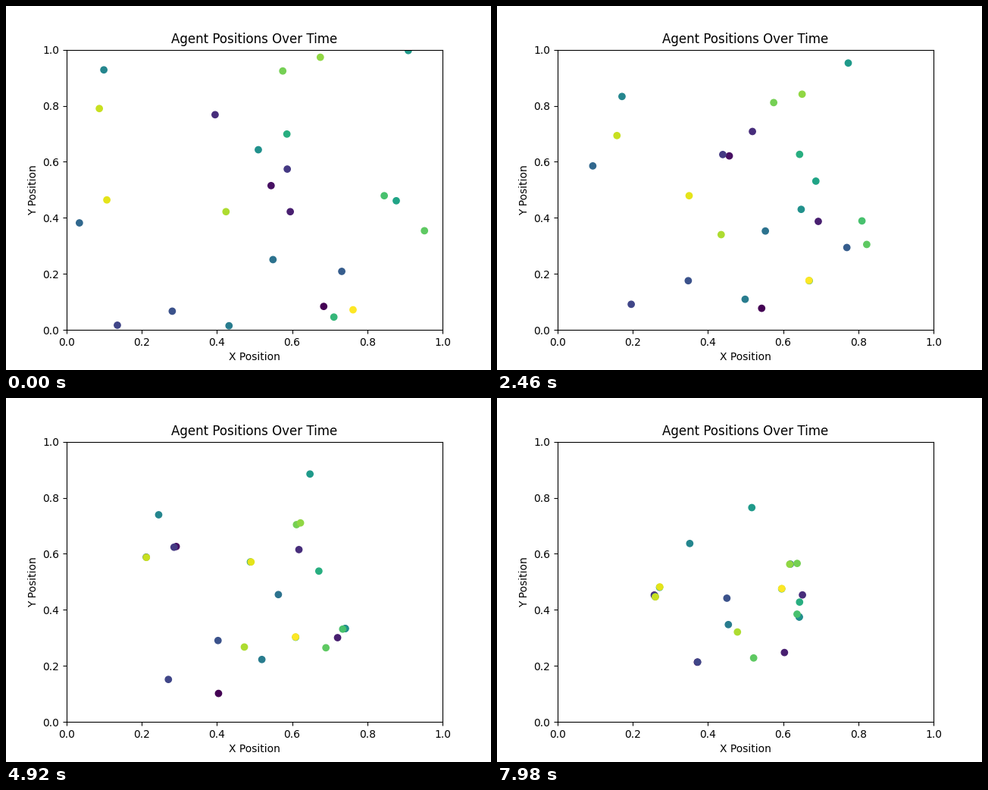
Recreate the animation shown at these times as a matplotlib script. Size 640 px wide and 480 px high, loop 8 s.

```python
import numpy as np
import matplotlib.pyplot as plt
from matplotlib.animation import FuncAnimation

HOLD_MS, TICK_MS, LOOP_MS = 60, 20, 8000
SUBSTEPS = 3

# The only data: start x, start y, speed (1e-5 per shown step), agent chased
AGENTS = np.array([
    (.684, .084, 345, 5), (.544, .515, 410, 4), (.595, .422, 256, 18),
    (.395, .768, 335, 15), (.587, .574, 382, 22), (.135, .017, 235, 21),
    (.281, .067, 311, 13), (.732, .209, 227, 17), (.034, .382, 520, 22),
    (.549, .251, 249, 19), (.432, .015, 284, 14), (.099, .928, 291, 24),
    (.510, .643, 620, 7), (.909, .997, 349, 22), (.877, .461, 494, 22),
    (.586, .699, 227, 18), (.711, .046, 450, 24), (.845, .479, 237, 24),
    (.952, .354, 338, 5), (.575, .924, 277, 12), (.675, .973, 327, 9),
    (.424, .422, 202, 10), (.087, .790, 292, 0), (.107, .464, 594, 14),
    (.762, .072, 343, 9),
])
start = AGENTS[:, :2]
stride = AGENTS[:, 2] * 1e-5 / SUBSTEPS
chased = AGENTS[:, 3].astype(int)


def advance(pos):
    """Move all agents straight at the ones they chase, never past them."""
    for _ in range(SUBSTEPS):
        gap = pos[chased] - pos
        dist = np.hypot(*gap.T)
        share = np.minimum(stride / np.maximum(dist, 1e-12), 1)
        pos = pos + gap * share[:, None]
    return pos


path = [start]
for _ in range(LOOP_MS // HOLD_MS):
    path.append(advance(path[-1]))

fig, ax = plt.subplots(figsize=(6.4, 4.8), dpi=100)
ax.set(xlim=(0, 1), ylim=(0, 1), xlabel="X Position", ylabel="Y Position",
       title="Agent Positions Over Time")
dots = ax.scatter(*start.T, c=np.arange(len(start)), cmap="viridis")


def update(tick):
    dots.set_offsets(path[tick * TICK_MS // HOLD_MS])
    return (dots,)


anim = FuncAnimation(fig, update, frames=LOOP_MS // TICK_MS,
                     interval=TICK_MS, repeat=True, repeat_delay=0)
plt.show()
```
